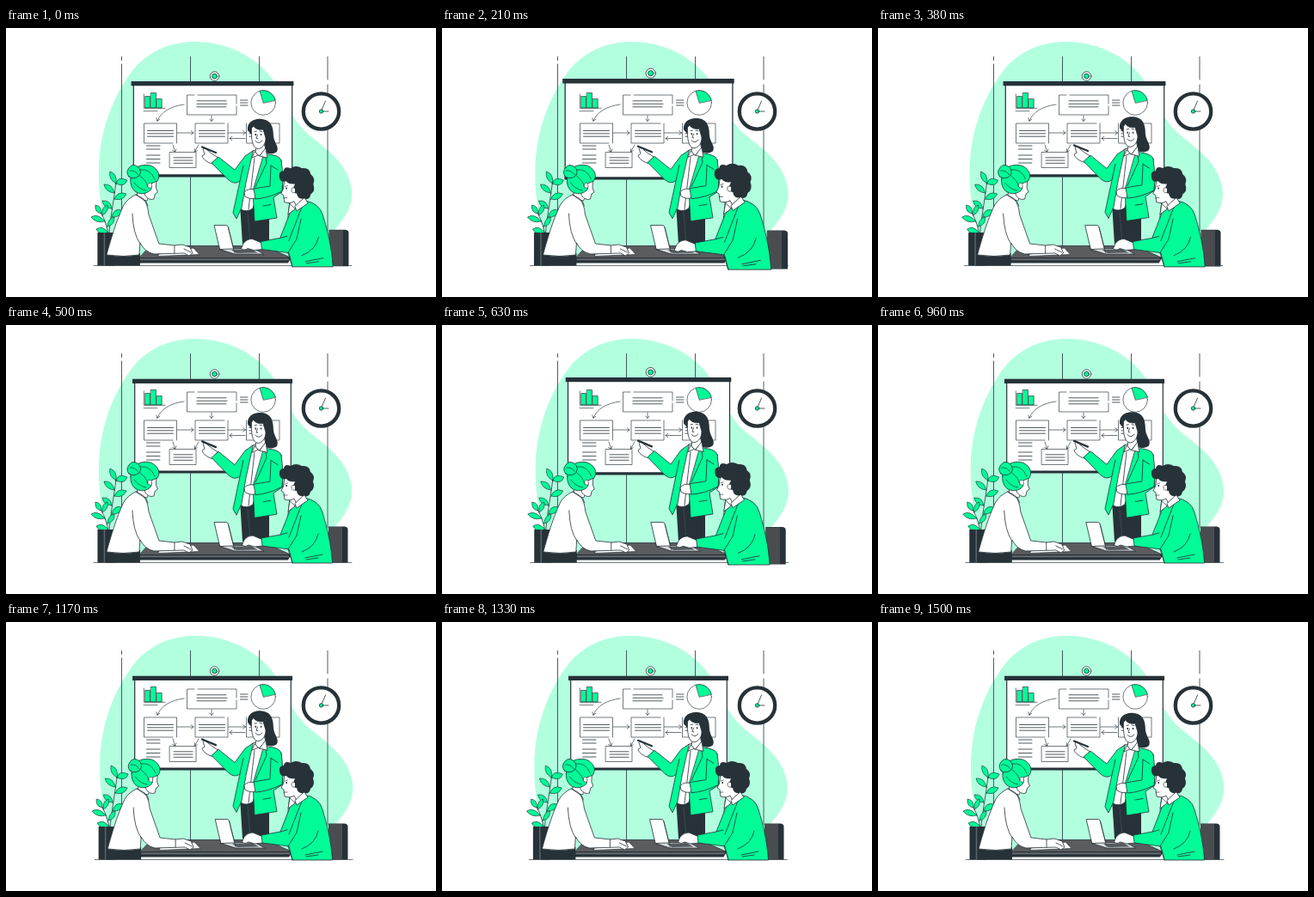
These frames come from a looping animation (500 by 313 pixels, 1540 ms). An HTML page:

```html
<!DOCTYPE html>
<html lang="en">
<head>
<meta charset="utf-8">
<title>Team meeting</title>
<style>
  html, body { margin: 0; height: 100%; overflow: hidden; background: #fff; }
  svg { display: block; width: 100vw; height: 100vh; }
  path, circle, rect, ellipse { vector-effect: none; }
  .ink { fill: #263238; }
  .green { fill: #00fb97; }
  .white { fill: #fff; }
  .line { fill: none; }
  .line, .edge { stroke: #263238; stroke-width: .8; stroke-linecap: round; stroke-linejoin: round; }
  .thin { stroke-width: .65; }
</style>
</head>
<body>
<svg viewBox="0 0 500 313" preserveAspectRatio="none">
  <g class="shake">
    <path fill="#b2ffdf" d="M220 16C262 16 298 38 314 66C328 92 334 108 352 124C374 142 398 158 402 188C404 208 394 222 378 240C360 262 320 270 250 270H130C116 240 107 205 108 163C109 120 124 78 150 46C168 26 192 16 220 16Z"/>
    <path class="line thin" d="M102 276.5H402"/>
  </g>
  <path class="line" d="M134.5 33.5v4M134.5 42V250M214.5 33.5V254M294.5 33.5V254M374 33.5V60M374 66V236"/>

  <g id="board">
    <rect class="white edge" x="149.7" y="66" width="181.6" height="105" style="stroke-width:1.2"/>
    <path class="ink" d="M147 62.8H333V68H147ZM149.2 169.5H331.8V172.6H149.2Z"/>
    <circle class="white edge" cx="242.5" cy="57" r="5.2"/>
    <circle class="green edge" cx="242.5" cy="57" r="2.9"/>
  </g>

  <g class="edge thin">
    <path class="green" d="M162 79.5h5.5V93H162ZM168.5 75.5h6V93h-6ZM175.5 82.5h5.7V93h-5.7Z"/>
    <path class="line thin" d="M160.3 77V93.3H185M160 96.7h16"/>
    <circle class="white" cx="299.2" cy="87" r="14.3"/>
    <path class="green" d="M299.2 87L295 73.3A14.3 14.3 0 0 1 313.2 84Z"/>
    <path class="line thin" d="M219 78H210.5V101H268V91M223 78H268V88
      M194 134H160.5V111H198.5V134M254 111H220V134H258V111M284 111H318V134H279.5V111M190.5 144.5H221V162.5H190.5Z
      M207 89C191 91 180 98 176 108M174.8 105l1 3.5 3-2.3M239 102v6.5m-2.2-2.5l2.2 2.5 2.2-2.5
      M199 122h19m-2.8-2.2l2.8 2.2-2.8 2.2M258.500 122h20m-2.800-2.200l2.800 2.200-2.800 2.200M278 128.500h-18m2.800-2.200l-2.800 2.200 2.800 2.200
      M194 136l2.600 8m-3-1.500l3 1.500 1.300-3M224 136l-4.500 8m0-3.200v3.200l2.800-1.200"/>
    <path class="line" d="M222 84.800h34M222 88.300h35M222 91.800h34M272.500 84h8.500M272.500 87h8.500M272.500 90h8.500
      M164.500 119.500h30M164.500 122.800h30M164.500 126.200h30M224.500 119.500h30M224.500 122.800h30M224.500 126.200h30M283 119.500h25M283 122.800h25M283 126.200h25
      M195 150.800h22M195 154h22M195 157.300h22M163.500 137h15.500M163.500 141h15.500M163.500 148h15.500M163.500 152.500h15.500M163.500 157h15.500"/>
  </g>

  <g id="clock">
    <circle class="white" cx="366.500" cy="97" r="20.700" stroke="#263238" stroke-width="4.300"/>
    <path class="line" d="M366.500 97L371.500 85M366.500 97H375"/>
    <circle class="green edge" cx="366.500" cy="97" r="2.200"/>
  </g>

  <g id="speaker">
    <path class="ink" d="M272 205H306L306 252H275Z"/>
    <path class="line" stroke-opacity=".5" style="stroke:#667" d="M281 215L284 250"/>
    <path class="white edge" d="M287 143L301 139L304 148L287 210Q280 215 273 211L277 168Z"/>
    <path class="line" d="M289 151L282 211"/>
    <path class="ink" d="M281 119C280 110 288 105 297 106C309 107 311 116 311 126C312 134 318 138 315 144C310 148 301 147 299 140Z"/>
    <path class="white edge" d="M291 138L290 145L294 149L302 142L300 132Z"/>
    <path class="white edge" d="M285.500 117C285 128 286 140 293 140.500C299 140 302 134 302 128L299 118C294 119 289 117 288 114Z"/>
    <path class="line" d="M289 120.500l2.500-.5M295 120l3 .5M292.500 124l-1.500 4.500 1.800.2M290 131.500Q294 136 298 131"/>
    <path class="ink" d="M289.500 123h1.500v2h-1.500zM295.800 123h1.500v2h-1.500z"/>
    <path class="white edge" d="M246 151L240 158C235 157 229 153 228 149L231 147L229 141Q231 138 234 142L239 146Z"/>
    <path d="M228 138.500L244 145" stroke="#263238" stroke-width="2.200" stroke-linecap="round"/>
    <path class="green edge" d="M287 143L278 149L266 165L247 150L239 157L259 177Q266 183 272 178L264 215L268 222L274 209L279 180Z"/>
    <path class="line" d="M272 178L276 160"/>
    <path class="green edge" d="M301 143L305 147Q318 148 320 154L322 190L311 197L315 221L289 225L287 190Z"/>
    <path class="white edge" d="M290 188Q281 186 277 191L278 196Q284 200 290 198Z"/>
    <path class="green edge" d="M320 154Q323 174 321 190Q305 198 290 199L288 187L307 184L308 160"/>
    <path class="line" d="M299 207l9-1.500M301 143L303 157L290 185M308 160l8 5"/>
    <path class="white edge" d="M289 144L286 151L293 148ZM302 140L304 151L295 149Z"/>
  </g>

  <g class="shake">
    <path class="line" d="M120 240C121 222 125 205 128 180M119 240C117 225 111 216 107 209"/>
    <g class="green edge thin">
      <path d="M128 181Q119 176 121 167Q130 170 128 181ZM128 181Q130 172 141 177Q138 186 128 181ZM126 192Q116 191 114 182Q124 181 126 192ZM126 199Q130 189 140 193Q136 202 126 199ZM123 210Q114 210 112 201Q122 200 123 210ZM123 220Q125 209 135 212Q133 221 123 220Z"/>
      <path d="M111 216Q103 215 104 206Q112 207 111 216ZM112 218Q111 208 118 206Q120 214 112 218ZM115 225Q105 228 99 220Q107 215 115 225ZM118 231Q119 221 126 220Q127 229 118 231ZM119 238Q109 242 105 234Q112 229 119 238Z"/>
    </g>
    <path class="ink" d="M106.500 238H128L126 276.500H106.500Z"/>
    <path d="M114.500 238V276" stroke="#59656b" stroke-width="1.500"/>
  </g>

  <g id="chair" class="pulse">
    <path class="ink" d="M375 234.500H394Q397.500 235 397.500 238V276.500H375Z"/>
    <path fill="#4a4d50" d="M375 235H391V276H375Z"/>
  </g>

  <g class="shake">
    <path fill="#5b5c5f" class="edge" d="M168 253.500H300L332 267.500H155Z"/>
    <path class="ink" d="M155 267H332L328 273.500H155Z"/>
    <path d="M156 269.300H329" stroke="#66696c" stroke-width="2"/>
    <path class="white edge thin" d="M178 263L218 256L225 263.500L177 265.500Z"/>

    <path class="ink" d="M118 262H156V276.500H116Q115 267 118 262Z"/>
    <path class="white edge" d="M153 190L152 198L164 201L170 188Z"/>
    <path class="white edge" d="M158 170L175 178L174.500 186L176.500 191L173.500 193L172 199Q166 201 162 195Z"/>
    <path class="white edge" d="M151 194Q142 198 137 206C128 225 122 246 117 264Q137 267 155 264L156 250Q162 261 172 263L207 262L213 265L217 262L214 255L205 252L196 253L178 251L166 217Q165 205 160 199Z"/>
    <path class="line" d="M147 216Q148 240 156 251M196 253v9M151 194L163 202L165 207M207 257l8 4"/>
    <path class="green edge" d="M145 176Q144 163 157 160Q170 157 176 166Q180 172 176 178L169 181Q171 188 165 191Q157 195 150 190Q144 184 145 176Z"/>
    <path class="green edge" d="M143 173Q139 168 143 163Q147 157 153 161Q159 166 155 172Q149 177 143 173Z"/>
    <path class="line thin" d="M144 166Q150 165 154 171M156 165Q168 163 173 176M156 172Q164 178 165 185M149 180Q155 188 163 189"/>
    <path class="white edge thin" d="M169 181q-4-2-4 2t4 3"/>

    <path class="white edge" d="M242.500 229.500H256Q258 229.500 258.500 232L266 262L249 257.500Z"/>
    <path fill="#d8dbdd" class="edge" d="M249 257.500L287 256L300 263L266 263Z"/>
    <path fill="#53595d" d="M262 258L285 257L293 261.500L268 262Z"/>
    <path class="line thin" d="M258.500 232L266 262"/>
  </g>

  <g id="sitter" class="pulse">
    <path class="white edge" d="M299 250L287 245Q281 245 277 250L274.500 256Q278 259 282 256L289 258L299 257Z"/>
    <path class="white edge" d="M330 201L328 220L331 252L342 210L347 199Z"/>
    <path class="white edge" d="M324 178L322.500 188L320 193L323 195L324 203Q331 205 335 202L338 208L347 200L344 180Z"/>
    <path class="ink" d="M318 174Q317 167 323 167Q324 161 331 164Q337 160 344 164Q353 163 354 171Q360 175 357 182Q360 190 354 194Q353 201 346 199Q339 200 338 193Q334 193 334 187L336 182Q329 183 326 179Q319 181 318 174Z"/>
    <path class="white edge thin" d="M336 187q-4-2-4 2t4 3"/>
    <path class="line thin" d="M324.500 185l3-1M323 198h4"/>
    <path class="ink" d="M325.500 186h1.500v2h-1.500z"/>
    <path class="green edge" d="M347 201Q364 204 368 218C374 238 378 255 379.500 277H333L329 261L298 257L297 248L319 244L330 216L339 207Z"/>
    <path class="line" d="M343 222L338 245L328 261M333 277L328 261M347 201L341 216L329 247M348 271l20-4M349 273l14-2M319 244l8-2M363 243Q360 258 344 264"/>
    <path class="white edge" d="M330 205L328 217L336 211ZM347 198L351 204L338 213L336 208Z"/>
  </g>
</svg>

<script>
const LOOP = 1540, CYCLE = 1500, LEAD = 22;
const $ = selector => [...document.querySelectorAll(selector)];
const shaken = $('.shake'), pulsed = $('.pulse');
const [board] = $('#board'), [speaker] = $('#speaker');

const beatKeys = [[0, 1], [.1, 1.1], [.3, 1], [.4, 1], [.5, 1.1], [.6, 1], [1, 1]];
const shakeKeys = [0, -1, 2, -4, 4, -4, 4, -4, 2, -1, 0].map((x, i) => [i / 10, x * .65]);

function tween(keys, p) {
  const i = Math.max(1, keys.findIndex(key => key[0] >= p));
  const [p0, v0] = keys[i - 1], [p1, v1] = keys[i];
  return v0 + (v1 - v0) * (p - p0) / (p1 - p0);
}

const scaleAt = (x, y, sx, sy) => `translate(${x} ${y}) scale(${sx} ${sy}) translate(${-x} ${-y})`;
const place = (node, transform) => node.setAttribute('transform', transform);

function draw(now) {
  const t = now % LOOP;
  const p = Math.min(1, (t + LEAD) / CYCLE);
  const beat = tween(beatKeys, p);
  const rise = 1 + .019 * (1 - Math.cos(2 * Math.PI * t / LOOP));
  place(board, scaleAt(240, 117, beat, beat));
  place(speaker, scaleAt(290, 250, 1, rise));
  for (const node of pulsed) place(node, scaleAt(335, 220, beat, beat));
  for (const node of shaken) place(node, `translate(${tween(shakeKeys, p)} 0)`);
}

const start = performance.now();
function frame() {
  draw(performance.now() - start);
  requestAnimationFrame(frame);
}
frame();
</script>
</body>
</html>
```
